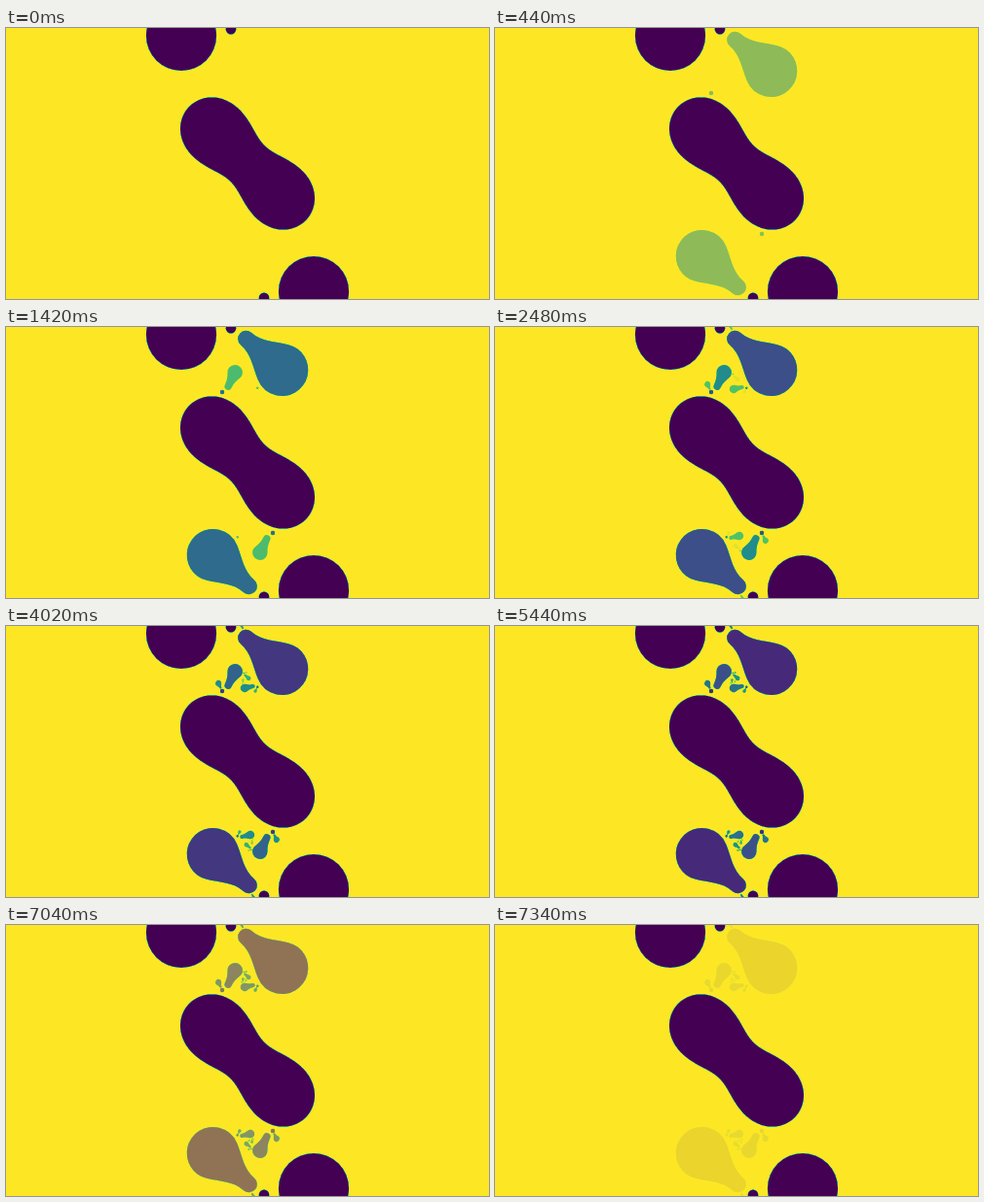
An HTML page with a canvas that plays this animation: 496x279 px, repeating every 7.4 s.

```html
<!DOCTYPE html>
<html lang="en">
<head>
<meta charset="utf-8">
<title>Blobs</title>
<style>
  html, body { margin: 0; width: 100%; height: 100%; overflow: hidden; background: #fde725; }
  canvas { display: block; }
</style>
</head>
<body>
<canvas id="stage" width="496" height="279"></canvas>
<script>
const W = 496, H = 279;
const STATES = 10, PERIOD = 740, HOLD = 200, STEP = 60;

// Colour ramp from depth 0 to the deepest level.
const RAMP = "440154 482475 414487 355f8d 2a788e 21918c 22a884 44bf70 7ad151 bddf26 fde725"
  .split(" ")
  .map(hex => [0, 2, 4].map(i => parseInt(hex.slice(i, i + 2), 16)));

function colorAt(v) {
  const i = Math.min(RAMP.length - 2, Math.floor(v * 10)), f = v * 10 - i;
  return RAMP[i].map((c, k) => Math.round(c + (RAMP[i + 1][k] - c) * f));
}

function dot(x, y, r) {
  const path = new Path2D();
  path.arc(x, y, r, 0, 2 * Math.PI);
  return path;
}

function moved(path, matrix) {
  const copy = new Path2D();
  copy.addPath(path, matrix);
  return copy;
}

// Cassini oval around the stage centre: distances to two foci have a constant product.
function cassini(focus, size, tilt) {
  const path = new Path2D(), f2 = focus ** 2, s4 = size ** 4;
  for (let i = 0; i < 360; i++) {
    const a = i * Math.PI / 180;
    const r = Math.sqrt(f2 * Math.cos(2 * a) + Math.sqrt(s4 - (f2 * Math.sin(2 * a)) ** 2));
    path.lineTo(W / 2 + r * Math.cos(a + tilt), H / 2 + r * Math.sin(a + tilt));
  }
  path.closePath();
  return path;
}

// Round head at (x, y) narrowing to a small round tail at (tx, ty).
function pear(x, y, r, tx, ty, tr) {
  const d = Math.hypot(tx - x, ty - y), a = 1.1, k = d * 0.3;
  const px = r * Math.cos(a), py = r * Math.sin(a);
  const cx = px + k * Math.sin(a), cy = py - k * Math.cos(a);
  const path = new Path2D();
  path.arc(0, 0, r, a, 2 * Math.PI - a);
  path.bezierCurveTo(cx, -cy, d - k, -tr, d, -tr);
  path.arc(d, 0, tr, -Math.PI / 2, Math.PI / 2);
  path.bezierCurveTo(d - k, tr, cx, cy, px, py);
  return moved(path, new DOMMatrix()
    .translate(x, y).rotate(Math.atan2(ty - y, tx - x) * 180 / Math.PI));
}

const shapes = [];
const add = (level, path) => shapes.push({ level, path });

add(0, cassini(56.4, 61.9, 44.3 * Math.PI / 180));
add(0, dot(180, 8, 36.1));
add(0, dot(231, 1.3, 5.3));
add(1, pear(283.5, 44.2, 26.8, 246.5, 12.2, 8.4));
add(3, pear(241.8, -0.4, 1.4, 243.2, 2.4, 0.7));

// One cluster repeats, a level deeper each time, along a spiral into a fixed point.
const HUB = [245.6, 56.2], SHRINK = 0.55, TURN = -128;
const cluster = [
  dot(222, 67, 2.2),
  pear(235.2, 46.7, 7.7, 228.2, 61.2, 3.7),
  pear(218.2, 59, 3, 220.4, 63.6, 1.1)
];
for (let n = 0; n < STATES; n++) {
  const matrix = new DOMMatrix()
    .translate(...HUB).rotate(TURN * n).scale(SHRINK ** n).translate(-HUB[0], -HUB[1]);
  cluster.forEach((path, i) => add(1 + n + i, moved(path, matrix)));
}

// Depth is drawn as grey first, so that smoothed edges pass through the ramp.
function renderState(count) {
  const canvas = document.createElement("canvas");
  canvas.width = W;
  canvas.height = H;
  const ctx = canvas.getContext("2d", { willReadFrequently: true });
  ctx.fillStyle = "#fff";
  ctx.fillRect(0, 0, W, H);
  for (const { level, path } of shapes.filter(s => s.level < count)) {
    const grey = Math.round(255 * level / count);
    ctx.fillStyle = `rgb(${grey},${grey},${grey})`;
    ctx.setTransform(1, 0, 0, 1, 0, 0);
    ctx.fill(path);
    if (path === shapes[0].path) continue; // already symmetric
    ctx.setTransform(-1, 0, 0, -1, W, H);
    ctx.fill(path);
  }
  const image = ctx.getImageData(0, 0, W, H);
  const lookup = Array.from({ length: 256 }, (_, i) => colorAt(i / 255));
  for (let i = 0; i < image.data.length; i += 4) {
    image.data.set(lookup[image.data[i]], i);
  }
  ctx.putImageData(image, 0, 0);
  return canvas;
}

const states = Array.from({ length: STATES }, (_, i) => renderState(i + 1));
const stage = document.getElementById("stage").getContext("2d");

function draw() {
  const t = performance.now() % (STATES * PERIOD);
  const index = Math.floor(t / PERIOD), local = t - index * PERIOD;
  const mix = local < HOLD ? 0 : (Math.floor((local - HOLD) / STEP) + 1) / 10;
  stage.globalAlpha = 1;
  stage.drawImage(states[index], 0, 0);
  stage.globalAlpha = mix;
  stage.drawImage(states[(index + 1) % STATES], 0, 0);
  requestAnimationFrame(draw);
}
draw();
</script>
</body>
</html>
```
